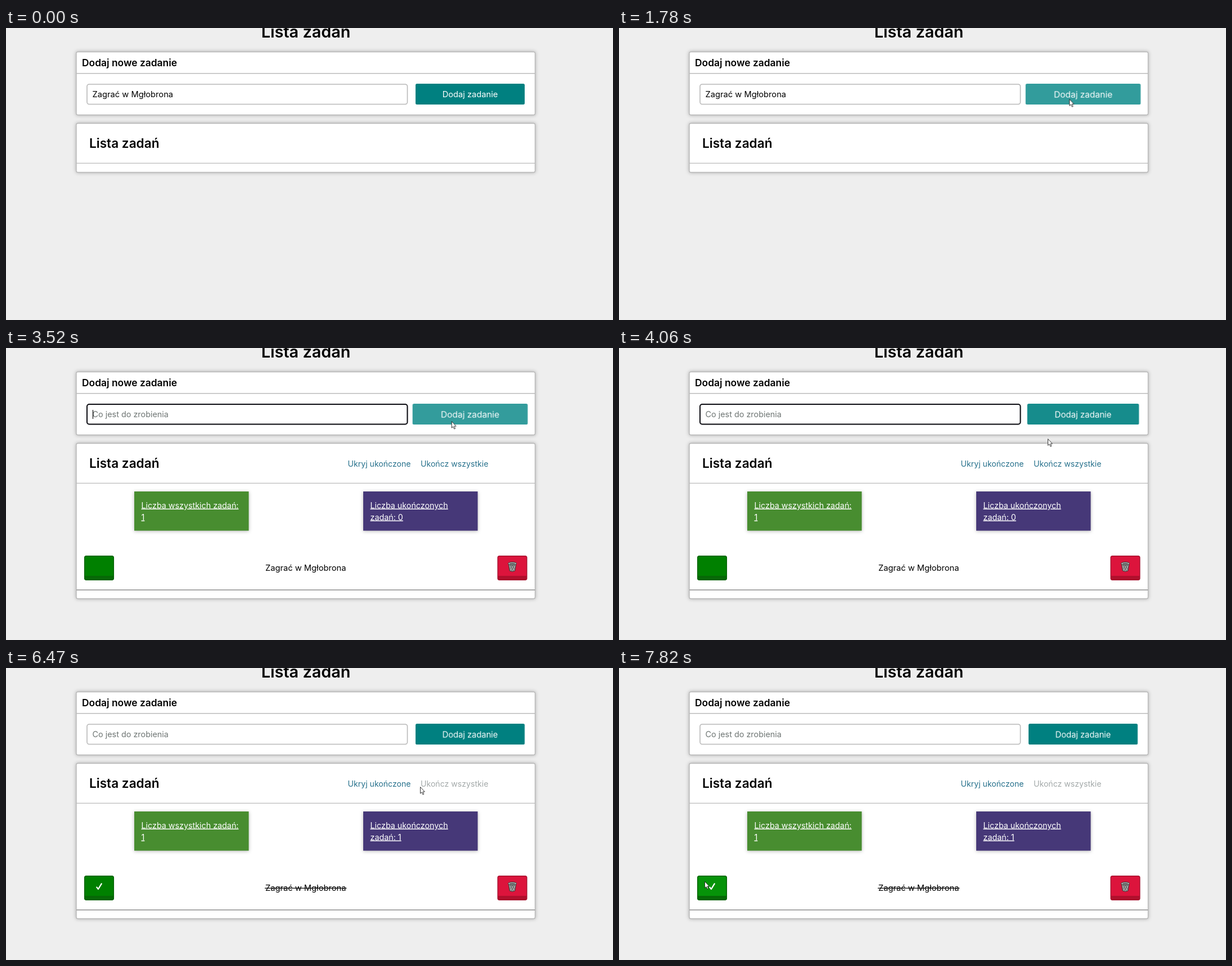
Recreate the animation shown at these times as an HTML page. Size 1079x519 px, loop 8000 ms.

```html
<!DOCTYPE html>
<html lang="pl">
<head>
<meta charset="utf-8">
<title>Lista zadań</title>
<style>
  html, body { margin: 0; width: 100%; height: 100%; overflow: hidden; background: #eee; }
  svg { display: block; width: 1079px; height: 519px; font: 14.4px Inter, "Open Sans", sans-serif; }
  .panel { fill: #fff; stroke: #b9b9b9; stroke-width: 1.4; filter: drop-shadow(0 0 3px rgba(0, 0, 0, .28)); }
  .rule { stroke: #bbb; stroke-width: 1.4; }
  .head { font-weight: 600; }
  .mid { text-anchor: middle; }
  .link { font-size: 14.1px; fill: #27718c; }
  .hint { fill: #6f7674; }
  .card { filter: drop-shadow(0 1px 3px rgba(0, 0, 0, .28)); }
  .stat { fill: #fff; font-size: 14.3px; text-decoration: underline; text-underline-offset: 2px; }
  #add { transform-box: fill-box; transform-origin: center; }
  #filled, #done, #focus { opacity: 0; }
</style>
</head>
<body>
<svg viewBox="0 0 1079 519">
  <rect width="1079" height="519" fill="#eee"/>
  <text class="head mid" x="533" y="17" font-size="28.8">Lista zadań</text>

  <rect class="panel" x="125" y="42.5" width="815.5" height="112" rx="2.5"/>
  <path class="rule" d="M125 80.8H940.5"/>
  <text class="head" x="135" y="67.5" font-size="17.4">Dodaj nowe zadanie</text>
  <rect x="144" y="100" width="569.5" height="35.5" rx="4" fill="#fff" stroke="#b8b8b8" stroke-width="1.6"/>
  <g id="add">
    <rect id="addBg" x="728" y="99" width="194" height="37" rx="2.5" fill="#008080"/>
    <text class="mid" x="825" y="123.3" font-size="14.7" fill="#fff">Dodaj zadanie</text>
  </g>

  <g id="empty">
    <text x="153.5" y="123.3" font-size="14.7">Zagrać w Mgłobrona</text>
    <rect class="panel" x="125" y="169.5" width="815.5" height="87" rx="2.5"/>
  </g>

  <g id="filled">
    <text class="hint" x="153.5" y="123.3">Co jest do zrobienia</text>
    <rect class="panel" x="125" y="169.5" width="815.5" height="276" rx="2.5"/>
    <path d="M125 430H940.5" stroke="#a9a9a9" stroke-width="2"/>
    <text class="link" x="607.5" y="210.5">Ukryj ukończone</text>

    <rect class="card" x="228" y="255" width="203.5" height="69.7" fill="#488d30"/>
    <text class="stat" x="240.5" y="284.5">Liczba wszystkich zadań:</text>
    <text class="stat" x="240.5" y="305.5">1</text>
    <rect class="card" x="635" y="255" width="203.5" height="69.7" fill="#463878"/>
    <text class="stat" x="647.5" y="284.5">Liczba ukończonych</text>

    <rect id="check" x="139.7" y="369.7" width="51.6" height="42.6" rx="3" fill="#008000"/>
    <path d="M139.7 405H191.3V410Q191.3 412.3 189 412.3H142Q139.7 412.3 139.7 410Z" fill="#066806"/>
    <rect x="139.7" y="369.7" width="51.6" height="42.6" rx="3" fill="none" stroke="#066306" stroke-width="1.5"/>

    <rect x="874.2" y="369.7" width="51.6" height="42.6" rx="3" fill="#dc143c"/>
    <path d="M874.2 405H925.8V410Q925.8 412.3 923.5 412.3H876.5Q874.2 412.3 874.2 410Z" fill="#b00f2c"/>
    <rect x="874.2" y="369.7" width="51.6" height="42.6" rx="3" fill="none" stroke="#a8102e" stroke-width="1.5"/>
    <g stroke="#333" stroke-width="1">
      <path d="M893.3 383.5L895.3 396Q900 398.6 904.7 396L906.7 383.5Z" fill="#a5a5a5"/>
      <path d="M896 386L902.5 397M900 386L904.6 394M904 386L897.5 397M900 386L895.4 394" stroke="#555" stroke-width=".8"/>
      <ellipse cx="900" cy="383.2" rx="7.5" ry="2.7" fill="#bdbdbd"/>
      <ellipse cx="900" cy="383.4" rx="5" ry="1.2" fill="#555" stroke="none"/>
    </g>
    <text class="mid" x="532.7" y="396.3" font-size="14.7">Zagrać w Mgłobrona</text>

    <g id="todo">
      <text class="stat" x="647.5" y="305.5">zadań: 0</text>
      <text class="link" id="all" x="737" y="210.5">Ukończ wszystkie</text>
    </g>
    <g id="done">
      <text class="stat" x="647.5" y="305.5">zadań: 1</text>
      <text class="link" x="737" y="210.5" style="fill:#a3a9a9">Ukończ wszystkie</text>
      <path d="M460 391.4H605.5" stroke="#000" stroke-width="1.3"/>
      <path d="M161.3 389.6L164 393L169.8 383.4" fill="none" stroke="#fff" stroke-width="2.2" stroke-linecap="round" stroke-linejoin="round"/>
    </g>
  </g>

  <path class="rule" d="M125 240.4H940.5"/>
  <text class="head" x="148" y="212.7" font-size="22.6">Lista zadań</text>
  <g id="focus">
    <rect x="144" y="100" width="569.5" height="35.5" rx="4" fill="none" stroke="#0c0c12" stroke-width="2"/>
    <path id="caret" d="M154.5 110V126" stroke="#000" stroke-width="1.1"/>
  </g>
  <path id="cursor" d="M.5 .5V12L3.1 9.7L5 14L6.8 13.2L5 9H8.4Z" fill="#fff" stroke="#222" stroke-width=".9" stroke-linejoin="round"/>
</svg>
<script>
const LOOP = 8000;

// steps: [ms, value, easing to the next step]
function play(id, prop, steps) {
  const first = steps[0], last = steps[steps.length - 1];
  const all = first[0] > 0 ? [[0, first[1]], ...steps] : steps;
  const frames = [...all, [LOOP, last[1]]].map(([ms, value, easing = 'linear']) =>
    ({ offset: ms / LOOP, [prop]: value, easing }));
  document.getElementById(id).animate(frames, { duration: LOOP, iterations: Infinity });
}

// hidden or shown at the start, flipped at every given time
function toggle(id, start, ...times) {
  play(id, 'opacity', [0, ...times].map((ms, i) => [ms, (start + i) % 2, 'step-end']));
}

const path = [
  [200, 996, 521], [1000, 875, 310], [1030, 873, 306], [1110, 859, 282],
  [1360, 822, 138, 'ease-out'], [1820, 800, 126], [3130, 800, 126, 'ease-in'],
  [3890, 775, 138], [3910, 773, 143], [4060, 762, 161], [4300, 757, 194, 'ease-out'],
  [4740, 756, 201], [5110, 756, 201, 'ease-in-out'], [5320, 736, 211],
  [6470, 736, 211, 'ease-in'], [7260, 406, 340], [7290, 400, 342, 'ease-out'], [7820, 152, 379]
];
play('cursor', 'transform', path.map(([ms, x, y, easing]) => [ms, `translate(${x}px, ${y}px)`, easing]));

const fade = (from, to) => [[1360, from, 'ease'], [1860, to], [3895, to, 'ease'], [4395, from]];
play('add', 'transform', fade('scaleX(1)', 'scaleX(1.055)'));
play('addBg', 'fill', fade('#008080', '#339c9c'));
play('all', 'fill', [[4300, '#27718c', 'ease'], [4800, '#12bab6']]);
play('check', 'fill', [[7560, '#008000', 'ease'], [7820, '#069309']]);

toggle('empty', 1, 2210);
toggle('filled', 0, 2210);
toggle('focus', 0, 2210, 5680);
toggle('caret', 0, 2330, 2840, 3340, 3840, 4400, 5110);
toggle('todo', 1, 5680);
toggle('done', 0, 5680);
</script>
</body>
</html>
```
